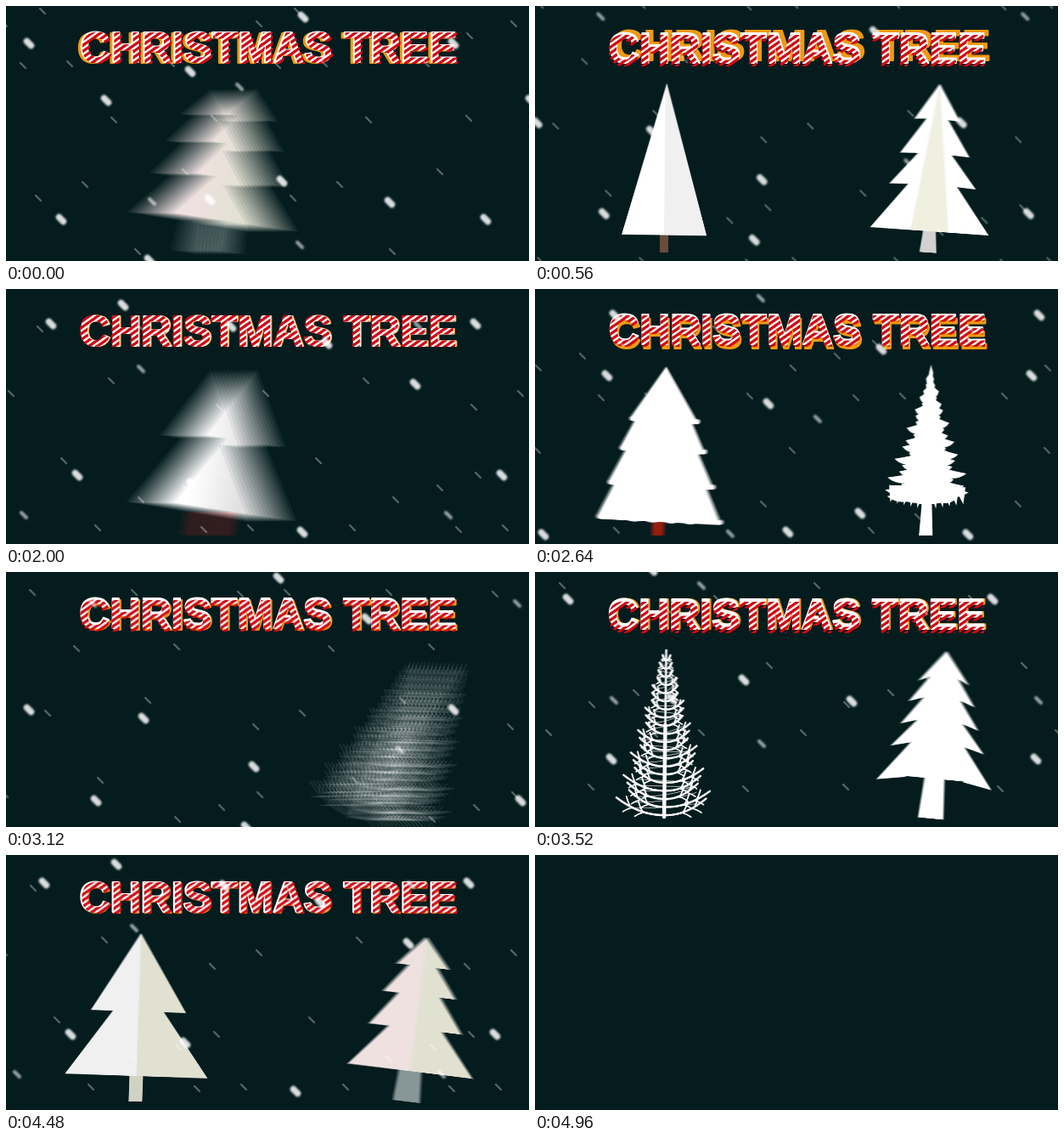
Recreate the animation shown at these times as an HTML page with a canvas. Size 616 by 300 pixels, loop 5040 ms.

```html
<!DOCTYPE html>
<html lang="en">
<head>
<meta charset="utf-8">
<title>Christmas tree</title>
<style>
html, body { margin: 0; width: 100%; height: 100%; overflow: hidden; background: #041c1e; }
canvas { display: block; }
</style>
</head>
<body>
<canvas id="stage" width="616" height="300"></canvas>
<script>
const W = 616, H = 300, LOOP = 5040, STEP = 80, BLANK_AT = 4960;
const ctx = document.getElementById('stage').getContext('2d');
const mod = (a, n) => ((a % n) + n) % n;
const clamp = v => Math.min(1, Math.max(0, v));

function sprite(w, h, scale, paint) {
  const c = document.createElement('canvas');
  c.width = w * scale;
  c.height = h * scale;
  const g = c.getContext('2d');
  g.scale(scale, scale);
  paint(g);
  return c;
}

function poly(g, color, points) {
  g.fillStyle = color;
  g.beginPath();
  points.forEach(p => g.lineTo(p[0], p[1]));
  g.closePath();
  g.fill();
}

// ---- Trees: origin at the foot, y grows downwards ----

// Levels are [y, half width, half width of the notch below].
function outline(tip, levels, rise = 0) {
  const right = [];
  levels.forEach(([y, half, notch], i) => {
    right.push([half, y]);
    if (i < levels.length - 1) right.push([notch, y - rise]);
  });
  const left = right.map(([x, y]) => [-x, y]).reverse();
  return [[0, tip], ...right, ...left];
}

function trunk(g, color, half, top, topHalf = half) {
  poly(g, color, [[-topHalf, top], [topHalf, top], [half, 0], [-half, 0]]);
}

// Fills a shape, then shades a wedge of it.
function shaded(g, points, light, dark, wedge) {
  poly(g, light, points);
  g.save();
  g.beginPath();
  points.forEach(p => g.lineTo(p[0], p[1]));
  g.clip();
  poly(g, dark, wedge);
  g.restore();
}

const rightHalf = [[0, -200], [100, -200], [100, 0], [0, 0]];

function plain(g) {
  trunk(g, '#63423a', 5, -24);
  shaded(g, [[2, -199], [50, -20], [-50, -21]], '#f8f8f8', '#eeeeee', rightHalf);
}

function banded(g) {
  trunk(g, '#d2ccc8', 10, -30, 7);
  shaded(g, outline(-199, [[-156, 27, 13], [-115, 41, 20], [-78, 51, 29], [-25, 70]], 1),
    '#f6f6f5', '#e6e4e1', [[0, -199], [23, -20], [-23, -20]]);
}

function layered(g) {
  [[-52, 56, -5, 78], [-88, 46, -46, 64], [-124, 36, -82, 55], [-197, 0, -119, 46]]
    .forEach(([top, topHalf, y, half]) => {
      const tier = dy => [[-topHalf, top], [topHalf, top], [half, y + dy], [-half, y + dy]];
      poly(g, '#d3d0cc', tier(2));
      shaded(g, tier(0), '#f6f5f4', '#efeeec', rightHalf);
    });
}

function twoTier(g) {
  trunk(g, '#c3141c', 7, -34);
  g.fillStyle = '#e8a0a0';
  for (let i = 0; i < 14; i++) g.fillRect(-5 + i % 3 * 4, -28 + i * 2, 1, 1);
  shaded(g, outline(-198, [[-112, 47, 23], [-28, 73]]), '#f5f5f4', '#dddbd3', rightHalf);
}

function snowy(g) {
  trunk(g, '#8a1a08', 7, -24);
  [[-60, 54, -19, 73], [-101, 42, -60, 62], [-136, 33, -101, 50], [-199, 0, -136, 40]]
    .forEach(([top, topHalf, y, half]) => {
      poly(g, '#f3f3f3', [[-topHalf, top], [topHalf, top], [half, y], [-half, y]]);
      g.fillStyle = '#ffffff';
      g.beginPath();
      g.roundRect(-half, y - 3, half * 2 + 3, 6, 3);
      for (let x = -half * .4; x < half * .6; x += half * .3) {
        g.moveTo(x, y - 2);
        g.ellipse(x, y - 2, half * .17, 6, 0, 0, 7);
      }
      g.fill();
    });
}

function fir(g) {
  trunk(g, '#f4f4f4', 8, -55, 5);
  g.fillStyle = '#f4f4f4';
  for (const side of [-1, 1]) {
    for (let i = 0; i < 21; i++) {
      const p = i / 20, y = -192 + 147 * p;
      const jag = .8 + .2 * Math.sin(i * 2.4 + side);
      const half = (3 + 54 * p ** 1.05) * jag;
      g.beginPath();
      g.moveTo(0, y - 9);
      g.quadraticCurveTo(side * half * .6, y - 3, side * half, y);
      g.quadraticCurveTo(side * half * .8, y + 8, side * half * .5, y + 6);
      g.lineTo(0, y + 9);
      g.fill();
    }
    for (let i = 0; i < 5; i++) {
      poly(g, '#f4f4f4', [[side * i * 8, -58], [side * (i * 8 + 13), -58], [side * (i * 8 + 11), -32 - i * 1.5]]);
    }
  }
  poly(g, '#f4f4f4', [[0, -200], [3, -183], [-3, -183]]);
}

function bare(g) {
  g.lineCap = 'round';
  const stroke = (color, width, x1, y1, x2, y2) => {
    g.strokeStyle = color;
    g.lineWidth = width;
    g.beginPath();
    g.moveTo(x1, y1);
    g.quadraticCurveTo((x1 + x2) / 2, y1 + 1, x2, y2);
    g.stroke();
  };
  for (let i = 0; i < 26; i++) {
    const p = i / 25, y = -185 + 168 * p, half = 5 + 43 * p;
    stroke('#9aa5a4', 1, -half * .8, y + 5, half * .8, y + 8 * Math.sin(i));
  }
  for (const side of [-1, 1]) {
    for (let i = 0; i < 20; i++) {
      const p = i / 19, y = -186 + 182 * p;
      const half = (5 + 52 * p) * (.87 + .13 * Math.sin(i * 2.1 + side));
      const lift = 6 + 14 * p;
      stroke('#f4f4f4', 2.4, 0, y, side * half, y - lift);
      for (const q of [.4, .65]) {
        const x = side * half * q, by = y - lift * q * q;
        stroke('#f4f4f4', 1.8, x, by, x + side * (2 + 6 * p), by - 4 - 9 * p);
        stroke('#f4f4f4', 1.6, x, by, x + side * (3 + 9 * p), by + 2 + 3 * p);
      }
    }
  }
  stroke('#f4f4f4', 2.5, 0, -198, 0, -90);
  stroke('#f4f4f4', 4.5, 0, -110, 0, -2);
}

function zigzag(g) {
  trunk(g, '#f4f4f4', 15, -60, 11);
  poly(g, '#f4f4f4', outline(-198,
    [[-160, 30, 17], [-135, 39, 22], [-108, 46, 27], [-81, 55, 32], [-40, 68, 34], [-47, 34]], 6));
}

function broad(g) {
  trunk(g, '#c9c6c0', 8, -34);
  shaded(g, outline(-198, [[-106, 56, 30], [-30, 84]]), '#f0efec', '#d9d7d1', rightHalf);
}

function frosted(g) {
  trunk(g, '#85898a', 16, -42, 13);
  shaded(g, outline(-195, [[-160, 31, 17], [-126, 43, 25], [-86, 55, 32], [-36, 74]]),
    '#e3e0db', '#d9d6d0', rightHalf);
}

const pairs = [[plain, banded], [layered, twoTier], [snowy, fir], [bare, zigzag], [broad, frosted]]
  .map(pair => pair.map(paint => sprite(240, 230, 2, g => {
    g.translate(120, 215);
    paint(g);
  })));

const sides = [
  { x: 152, enter: 35, duration: 530, leave: 550 },
  { x: 460, enter: 45, duration: 700, leave: 720 }
];

function pose(side, time) {
  const rest = 1 - clamp((time - side.enter) / side.duration);
  const out = Math.max(0, (time - side.leave) / 280);
  return {
    x: side.x + 560 * rest ** 4 - 221 * out ** 3,
    lean: 30 * rest ** 1.5 + 9 * out
  };
}

const blurLayer = sprite(W, H, 1, () => {});
const blur = blurLayer.getContext('2d');
const SAMPLES = 15, SHUTTER = 24;

function drawTree(image, side, time) {
  const { x } = pose(side, time);
  if (x < -220 || x > W + 220) return;
  blur.globalCompositeOperation = 'lighter';
  blur.clearRect(0, 0, W, H);
  blur.globalAlpha = 1 / SAMPLES;
  for (let i = 0; i < SAMPLES; i++) {
    const p = pose(side, time + (i / (SAMPLES - 1) - .5) * SHUTTER);
    blur.save();
    blur.translate(p.x, 290);
    blur.rotate(p.lean * Math.PI / 180);
    blur.drawImage(image, -120, -215, 240, 230);
    blur.restore();
  }
  ctx.drawImage(blurLayer, 0, 0);
}

function drawTrees(t) {
  const now = Math.floor(t / 1000);
  for (const k of [now - 1, now]) {
    sides.forEach((side, i) => drawTree(pairs[mod(k, 5)][i], side, t - k * 1000));
  }
}

// ---- Snow: two repeating tiles drifting diagonally ----

const flake = (length, width, alpha, soft) => sprite(30, 30, 1, g => {
  g.filter = `blur(${soft}px)`;
  g.strokeStyle = `rgba(255,255,255,${alpha})`;
  g.lineWidth = width;
  g.lineCap = 'round';
  g.beginPath();
  g.moveTo(15 - length / 2, 15 - length / 2);
  g.lineTo(15 + length / 2, 15 + length / 2);
  g.stroke();
});

const snow = [
  { tile: 300, image: flake(6, 2.4, .32, .6), at: [[43, 6], [20, 70], [75, 68], [195, 68], [127, 134],
    [245, 132], [246, 35], [211, 195], [93, 210], [38, 226], [155, 289], [298, 21]] },
  { tile: 500, image: flake(6, 4, .6, .8), at: [[275, 95], [346, 281], [172, 230], [208, 453]] },
  { tile: 500, image: flake(5, 7.5, .85, 1.3), at: [[27, 44], [118, 111], [217, 77], [350, 13], [65, 251],
    [325, 206], [240, 228], [452, 231], [169, 299], [36, 473], [271, 406], [406, 416]] }
];

function drawSnow(t) {
  const phase = t % 2500;
  let drift = .4 * phase + 13 * clamp(phase / 1000);
  if (phase > 2040) drift -= 1000;
  for (const { tile, image, at } of snow) {
    for (const [px, py] of at) {
      for (let x = mod(px + drift, tile) - tile; x < W + 15; x += tile) {
        for (let y = mod(py + drift, tile) - tile; y < H + 15; y += tile) {
          ctx.drawImage(image, x - 15, y - 15);
        }
      }
    }
  }
}

// ---- Title: orange, white and striped layers drifting apart ----

const stripes = ctx.createPattern(sprite(10, 7, 1, g => {
  g.strokeStyle = '#cf0a14';
  g.lineWidth = 3.2;
  for (const dx of [-10, 0, 10]) {
    g.beginPath();
    g.moveTo(dx - 10, 14);
    g.lineTo(dx + 20, -7);
    g.stroke();
  }
}), 'repeat');

// time, then x and y of the orange, white and striped layers
const drifts = [
  [0, -3, 0, 0, -1, 2, 0],
  [560, 5, -3, 0, 0, -1, 3],
  [1360, 0, -4, 0, 2, -2, 0],
  [2640, 2, 3, 0, -2, 0, 0],
  [3520, 1, 0, -1, 0, -1, 4],
  [4080, 3, 2, -1, 0, 1, 1],
  [5040, -3, 0, 0, -1, 2, 0]
];

function drawTitle(t) {
  const i = drifts.findIndex(d => d[0] > t), a = drifts[i - 1], b = drifts[i];
  const p = (t - a[0]) / (b[0] - a[0]), e = p * p * (3 - 2 * p);
  ctx.font = 'bold 50px "Liberation Sans", Arial, sans-serif';
  ctx.textAlign = 'center';
  ctx.lineJoin = 'round';
  ctx.lineWidth = 2;
  ['#f09a10', '#ffffff', stripes].forEach((paint, n) => {
    const at = j => a[j] + (b[j] - a[j]) * e;
    ctx.save();
    ctx.translate(309 + at(1 + n * 2), 67 + at(2 + n * 2));
    ctx.fillStyle = ctx.strokeStyle = paint;
    ctx.strokeText('CHRISTMAS TREE', 0, 0);
    ctx.fillText('CHRISTMAS TREE', 0, 0);
    ctx.restore();
  });
}

const start = performance.now();

function frame() {
  const t = Math.floor(((performance.now() - start) % LOOP) / STEP) * STEP;
  ctx.fillStyle = '#041c1e';
  ctx.fillRect(0, 0, W, H);
  if (t < BLANK_AT) {
    drawTrees(t);
    drawTitle(t);
    drawSnow(t);
  }
  requestAnimationFrame(frame);
}
frame();
</script>
</body>
</html>
```
